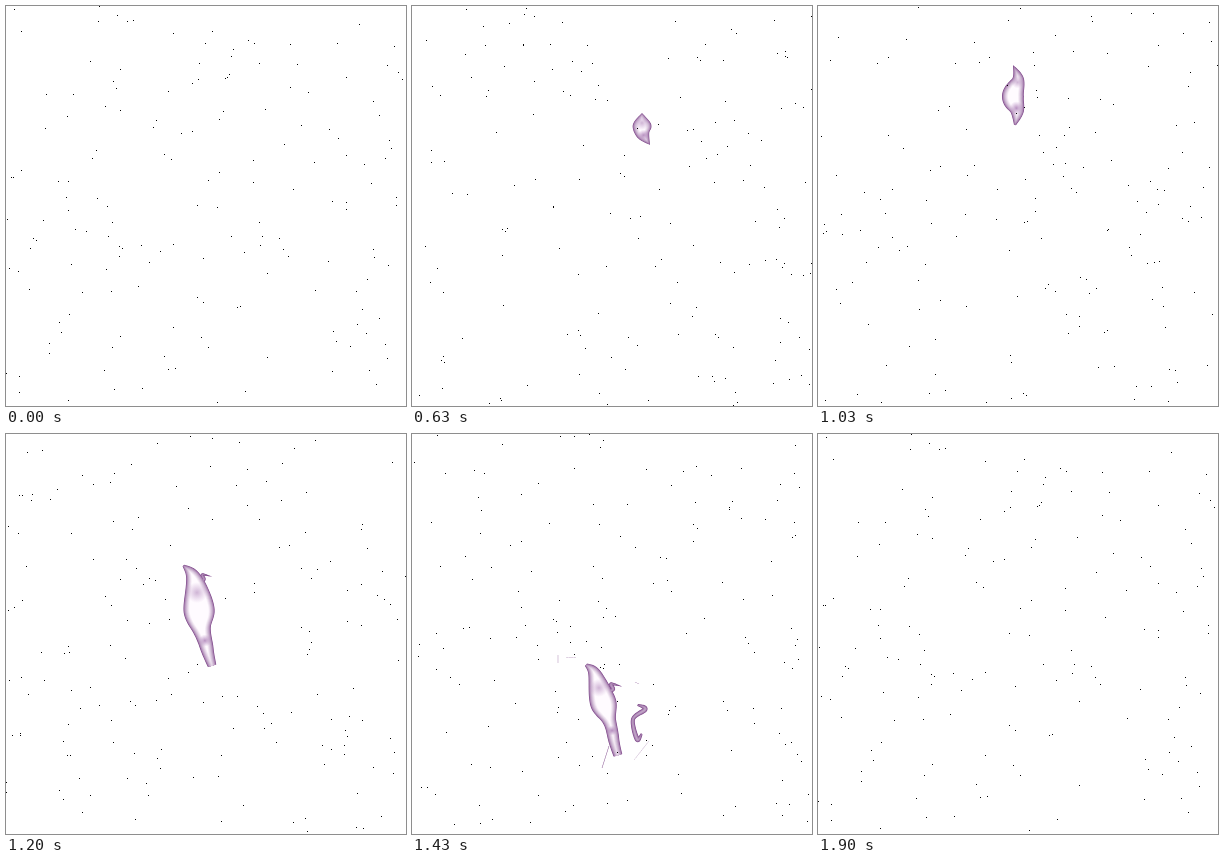
Animation, 400 px wide and 400 px high, one loop 2000 ms. Source, as an HTML page with a canvas:

```html
<!DOCTYPE html>
<html lang="en">
<head>
<meta charset="utf-8">
<title>Violet wisp</title>
<style>
  html, body { margin: 0; width: 100%; height: 100%; overflow: hidden; background: #fff; }
  canvas { display: block; width: 400px; height: 400px; }
</style>
</head>
<body>
<canvas id="stage" width="400" height="400"></canvas>
<script>
const ctx = document.getElementById('stage').getContext('2d');
const LOOP = 2000, SAMPLES = 60, SPECKS = 168;
const EDGE = [124, 68, 136], CORE = [255, 251, 255];

const mix = (a, b, f) => a + (b - a) * f;

function spline(a, b, c, d, f) {
  return b + f * (c - a + f * (2 * a - 5 * b + 4 * c - d + f * (3 * (b - c) + d - a))) / 2;
}

// A ribbon is a smooth spine through a few knots: x, y, half width.
function ribbon(...knots) {
  const last = knots.length - 1;
  const knot = i => knots[Math.max(0, Math.min(last, i))];
  return Array.from({ length: SAMPLES + 1 }, (_, n) => {
    const u = n / SAMPLES * last, i = Math.min(last - 1, Math.floor(u));
    return [0, 1, 2].map(k =>
      spline(knot(i - 1)[k], knot(i)[k], knot(i + 1)[k], knot(i + 2)[k], u - i));
  });
}

const key = (time, ...knots) => ({ time, spine: ribbon(...knots) });

const trunk = [
  key(300, [150, 213, 0], [150, 216, 0]),
  key(330, [154, 206, 1], [151, 212, 1]),
  key(630, [230, 107, 0], [230, 118, 9], [231, 128, 7], [238, 139, 0]),
  key(1030, [195, 59, 0], [200, 73, 6], [195, 90, 11], [199, 105, 7], [197, 119, 1]),
  key(1330, [164, 187, 2], [178, 200, 10], [190, 245, 20], [196, 274, 8], [203, 298, 7], [213, 318, 7]),
  key(1570, [188, 292, 1], [191, 300, 3], [201, 309, 5], [196, 326, 1]),
  key(1700, [197, 314, 0], [197, 316, 0])
];

const arm = [
  key(1130, [186, 120, 0], [188, 120, 0]),
  key(1330, [174, 192, 3], [203, 198, 3], [218, 193, 5], [213, 179, 4], [240, 185, 0]),
  key(1500, [188, 298, 0], [190, 300, 0])
];

const tail = [
  key(1200, [217, 220, 0], [219, 220, 0]),
  key(1330, [224, 245, 1], [239, 249, 3], [221, 262, 2], [231, 292, 3], [241, 279, 1]),
  key(1570, [228, 307, 1], [221, 318, 2], [214, 329, 1]),
  key(1670, [217, 326, 0], [216, 327, 0])
];

// Short-lived scraps: time of full size, two ends, half width
const scraps = [
  [1330, [146, 213], [146, 221], 1.7],
  [1330, [154, 215], [164, 216], 1.2],
  [1330, [223, 240], [227, 242], 1.5],
  [1330, [237, 299], [222, 318], 1],
  [1330, [197, 304], [190, 326], 2.5],
  [1570, [183, 303], [183, 314], 4],
  [1570, [188, 327], [195, 333], 1.8]
];

function pose(keys, t) {
  const next = keys.findIndex(k => k.time > t);
  if (next < 1) return [];
  const a = keys[next - 1], b = keys[next], f = (t - a.time) / (b.time - a.time);
  return [a.spine.map((p, n) => p.map((v, k) => mix(v, b.spine[n][k], f)))];
}

function scrapPose([time, from, to, width], t) {
  const size = 1 - Math.abs(t - time) / 110;
  if (size <= 0) return [];
  const shift = (t - time) * .08;
  const knot = ([x, y]) => [x, y + shift, width * size];
  return [ribbon(knot(from), knot(to))];
}

function fillRibbon(spine, inset) {
  const left = [], right = [];
  spine.forEach(([x, y, w], n) => {
    const a = spine[Math.max(0, n - 1)], b = spine[Math.min(SAMPLES, n + 1)];
    const dx = b[0] - a[0], dy = b[1] - a[1], len = Math.hypot(dx, dy) || 1;
    const r = Math.max(0, w - inset) / len;
    left.push([x + dy * r, y - dx * r]);
    right.unshift([x - dy * r, y + dx * r]);
  });
  ctx.beginPath();
  [...left, ...right].forEach(([x, y]) => ctx.lineTo(x, y));
  ctx.fill();
}

// A soft violet fold across the ribbon
function drawFold(spine, at, alpha) {
  const [x, y, w] = spine[Math.round(at * SAMPLES)];
  const r = Math.max(.1, w * .85);
  const glow = ctx.createRadialGradient(x, y, 0, x, y, r);
  glow.addColorStop(0, `rgba(135,75,150,${alpha})`);
  glow.addColorStop(1, 'rgba(160,100,175,0)');
  ctx.fillStyle = glow;
  ctx.fillRect(x - r, y - r, 2 * r, 2 * r);
}

// Narrowing layers from dark edge to pale core join overlapping ribbons.
function drawWisp(t) {
  const spines = [
    ...[trunk, arm, tail].flatMap(keys => pose(keys, t)),
    ...scraps.flatMap(scrap => scrapPose(scrap, t))
  ];
  for (let inset = 0; inset <= 6; inset += .5) {
    const f = (inset / 6) ** .55;
    ctx.fillStyle = `rgb(${EDGE.map((c, k) => mix(c, CORE[k], f))})`;
    spines.forEach(spine => fillRibbon(spine, inset));
  }
  pose(trunk, t).forEach(spine => {
    drawFold(spine, .3, .4);
    drawFold(spine, .7, .6);
  });
}

function random(seed) {
  return () => {
    seed = (seed + 0x6D2B79F5) | 0;
    let n = Math.imul(seed ^ (seed >>> 15), 1 | seed);
    n = (n + Math.imul(n ^ (n >>> 7), 61 | n)) ^ n;
    return ((n ^ (n >>> 14)) >>> 0) / 4294967296;
  };
}

function drawSpecks(step) {
  const next = random(step * 977 + 41);
  const place = () => Math.floor(next() * 400);
  ctx.fillStyle = '#000';
  for (let i = 0; i < SPECKS; i++) ctx.fillRect(place(), place(), 1, 1);
}

// Thirty steps a second, each starting on a multiple of 10 ms
const stepStart = step => Math.round(step * 10 / 3) * 10;

function stepAt(t) {
  let step = Math.floor(t * 3 / 100) + 1;
  while (stepStart(step) > t) step--;
  return step < 2 || step >= 57 ? 0 : step;
}

let shown = -1;
function draw(now) {
  const step = stepAt(now % LOOP);
  if (step === shown) return;
  shown = step;
  ctx.fillStyle = '#fff';
  ctx.fillRect(0, 0, 400, 400);
  drawWisp(stepStart(step));
  drawSpecks(step);
}

const begin = performance.now();
function tick() {
  draw(performance.now() - begin);
  requestAnimationFrame(tick);
}
tick();
</script>
</body>
</html>
```
